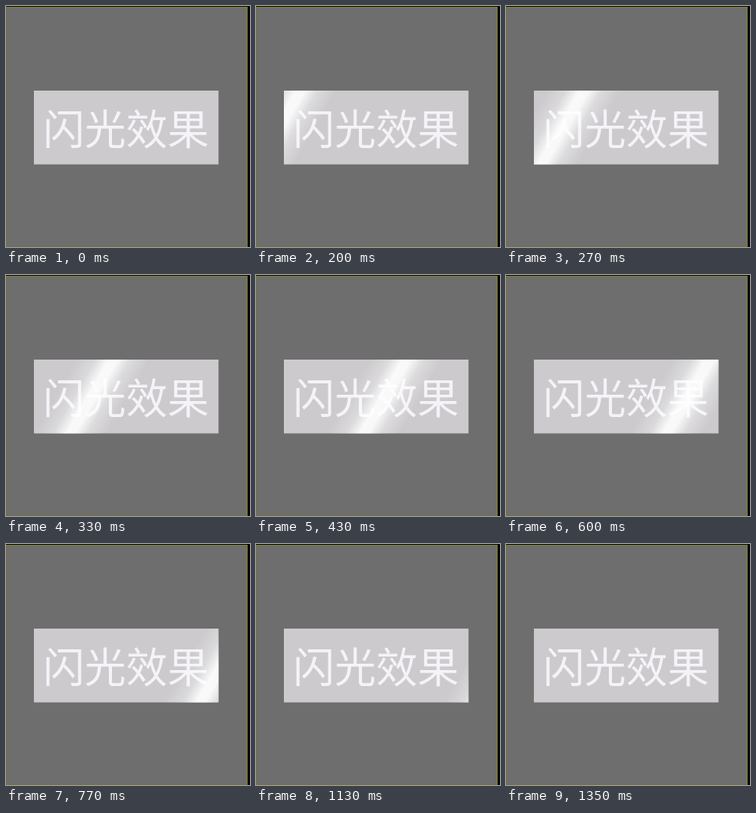
An HTML page for the animation above (1.39 s loop, 306 px wide and 302 px high).

```html
<!DOCTYPE html>
<html lang="zh">
<head>
<meta charset="utf-8">
<title>闪光效果</title>
<style>
  html, body { margin: 0; width: 100%; height: 100%; overflow: hidden; background: #6e6e6e; }
  svg { display: block; width: 100vw; height: 100vh; }
  text { font: 500 52px "Noto Sans CJK SC", "Noto Sans CJK", sans-serif; fill: #f5f3f8; }
</style>
</head>
<body>
<svg viewBox="0 0 306 302">
  <defs>
    <linearGradient id="shine">
      <stop offset="0" stop-color="#fff" stop-opacity="0"/>
      <stop offset=".26" stop-color="#fff" stop-opacity=".28"/>
      <stop offset=".45" stop-color="#fff" stop-opacity=".9"/>
      <stop offset=".57" stop-color="#fff" stop-opacity=".88"/>
      <stop offset=".74" stop-color="#fff" stop-opacity=".32"/>
      <stop offset="1" stop-color="#fff" stop-opacity="0"/>
    </linearGradient>
    <clipPath id="card"><rect x="35" y="106" width="231.5" height="92.5"/></clipPath>
  </defs>
  <rect width="306" height="302" fill="#6e6e6e"/>
  <path d="M.5 2V301.5H302" fill="none" stroke="#74713f"/>
  <path d="M0 1.5H302.5V302" fill="none" stroke="#7f7f2c"/>
  <path d="M0 0H306V302H303V1H0Z" fill="#080808"/>
  <rect x="35" y="106" width="231.5" height="92.5" fill="#cccacd"/>
  <text x="46.5" y="174">闪光效果</text>
  <g clip-path="url(#card)">
    <rect id="band" x="-46" y="-60" width="92" height="120" fill="url(#shine)"/>
  </g>
</svg>
<script>
  const LOOP = 1390, SWEEP = 1300, START = -40, END = 312, RESET = 1350;
  const band = document.getElementById('band');

  // cubic-bezier(.25, .1, .25, 1)
  const bezier = (a, b, u) => 3 * a * u * (1 - u) ** 2 + 3 * b * u * u * (1 - u) + u ** 3;
  function ease(p) {
    let lo = 0, hi = 1;
    for (let i = 0; i < 24; i++) {
      const mid = (lo + hi) / 2;
      if (bezier(.25, .25, mid) < p) lo = mid; else hi = mid;
    }
    return bezier(.1, 1, lo);
  }

  function draw(ms) {
    const t = ms % LOOP;
    const x = START + (END - START) * ease(Math.min(t / SWEEP, 1));
    band.setAttribute('transform', `translate(${x.toFixed(2)} 152) skewX(-30)`);
    band.setAttribute('visibility', t < RESET ? 'visible' : 'hidden');
  }

  function tick() {
    draw(performance.now());
    requestAnimationFrame(tick);
  }
  tick();
</script>
</body>
</html>
```
